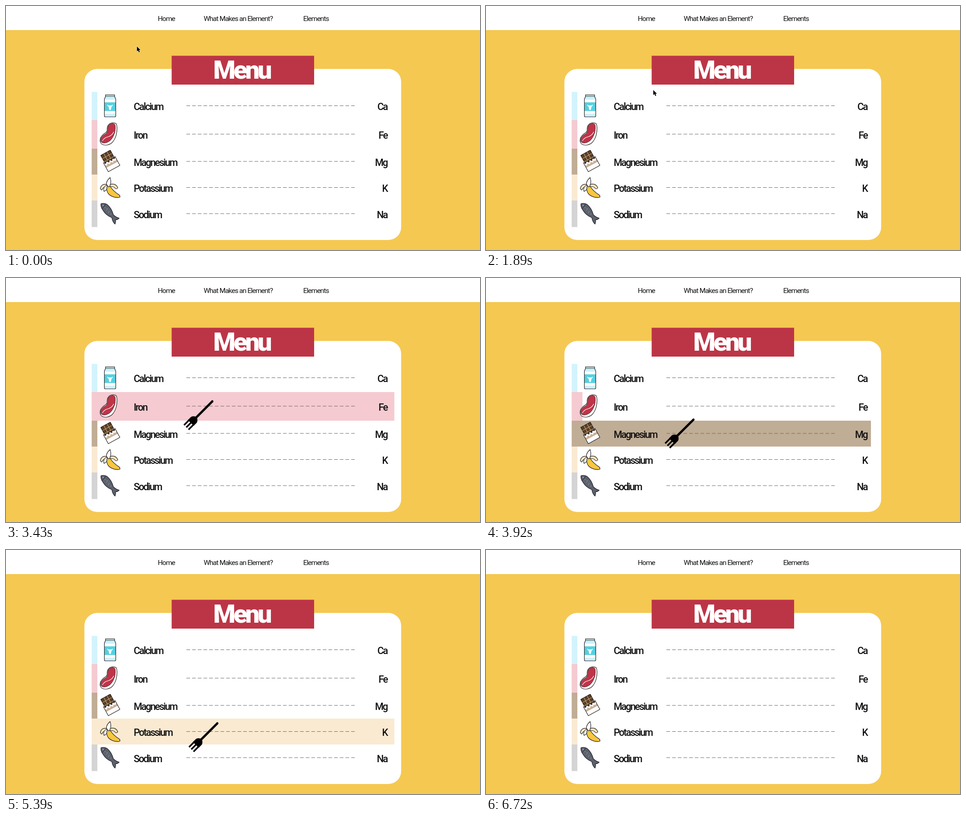
Animation of 1043x537 px, one loop 6790 ms. Source, as an HTML page with a canvas:

```html
<!DOCTYPE html>
<html lang="en">
<head>
<meta charset="utf-8">
<title>Menu of elements</title>
<style>
html, body { margin: 0; width: 100%; height: 100%; overflow: hidden; background: #f5c851; }
canvas { display: block; width: 1043px; height: 537px; }
</style>
</head>
<body>
<canvas id="stage" width="1043" height="537"></canvas>
<script>
const ctx = document.getElementById('stage').getContext('2d');
const LOOP = 6790, STEP = 70, EASE_MS = 500;
const INK = '#231f20';
const LEFT = 188.5, THIN = 12.5, FULL = 666;

const styles = {
  nav: { font: '400 15.5px Roboto, sans-serif', spacing: -1, fill: '#111' },
  label: { font: '500 21.5px Roboto, sans-serif', spacing: -2, fill: '#111' },
  title: { font: '900 56px Roboto, sans-serif', spacing: -4.5, fill: '#fff' }
};

// on and off: when the pointer enters and leaves the row
const rows = [
  { name: 'Calcium', sym: 'Ca', top: 189, end: 251, base: 229, line: 219.5, color: '#d3f3fd', on: 1950, off: 2710, icon: milk },
  { name: 'Iron', sym: 'Fe', top: 251, end: 314, base: 292, line: 282, color: '#f5cad0', on: 2710, off: 3490, icon: steak },
  { name: 'Magnesium', sym: 'Mg', top: 314, end: 371, base: 352, line: 342, color: '#c0ad95', on: 3490, off: 4290, icon: chocolate },
  { name: 'Potassium', sym: 'K', top: 371, end: 428, base: 409, line: 399.5, color: '#faead1', on: 4290, off: 5500, icon: banana },
  { name: 'Sodium', sym: 'Na', top: 428, end: 486.5, base: 467, line: 457, color: '#d4d4d4', on: 5500, off: 6030, icon: fish }
];
const forkOn = rows[0].on, forkOff = rows[4].off;

// pointer path: time, x, y
const path = [
  [0, 288, 88], [1190, 325, 127], [1950, 372, 189], [2590, 415, 241],
  [3430, 425, 309], [4290, 429, 371], [4550, 430, 377], [5390, 436, 419],
  [5500, 436, 428], [6030, 433, 486], [6720, 422, 535]
];

// CSS "ease" curve, solved by bisection
function ease(p) {
  if (p <= 0) return 0;
  if (p >= 1) return 1;
  let lo = 0, hi = 1, u;
  for (let i = 0; i < 24; i++) {
    u = (lo + hi) / 2;
    const x = 0.75 * u * (1 - u) + u ** 3;
    if (x < p) lo = u; else hi = u;
  }
  return 0.3 * u * (1 - u) ** 2 + 3 * u * u * (1 - u) + u ** 3;
}

function slope(i, k) {
  if (i === 0 || i === path.length - 1) return 0;
  const [a, b, c] = [path[i - 1], path[i], path[i + 1]];
  const m = (b[k] - a[k]) / (b[0] - a[0]), n = (c[k] - b[k]) / (c[0] - b[0]);
  return m * n <= 0 ? 0 : 2 * m * n / (m + n);
}

function pointer(t) {
  let i = 0;
  while (i < path.length - 2 && t > path[i + 1][0]) i++;
  const a = path[i], b = path[i + 1], d = b[0] - a[0];
  const u = Math.min(1, (t - a[0]) / d), v = 1 - u;
  return [1, 2].map(k => v * v * (1 + 2 * u) * a[k] + u * u * (3 - 2 * u) * b[k]
    + d * u * v * (v * slope(i, k) - u * slope(i + 1, k)));
}

function shape(d, fill, stroke, width = 1.2) {
  const p = new Path2D(d);
  if (fill) { ctx.fillStyle = fill; ctx.fill(p); }
  if (stroke) { ctx.strokeStyle = stroke; ctx.lineWidth = width; ctx.stroke(p); }
}

function rect(x, y, w, h, fill) {
  ctx.fillStyle = fill;
  ctx.fillRect(x, y, w, h);
}

function text(s, x, y, style, align = 'left') {
  ctx.font = style.font;
  ctx.letterSpacing = style.spacing + 'px';
  ctx.textAlign = align;
  ctx.fillStyle = style.fill;
  ctx.fillText(s, x, y);
}

function milk() {
  const body = 'M219 195.500H239V199L241.500 205V242Q241.500 244 239.500 244H218.500Q216.500 244 216.500 242V205L219 199Z';
  ctx.save();
  ctx.clip(new Path2D(body));
  rect(215, 194, 28, 52, '#fff');
  rect(215, 194, 28, 5, '#a9e6f0');
  rect(215, 199, 28, 7, '#cdf1fa');
  rect(215, 212, 28, 19, '#57d0e0');
  rect(215, 237, 28, 8, '#cdf1fa');
  ctx.restore();
  shape(body, null, INK);
  shape('M219 199H239', null, INK, 0.8);
  shape('M223 217L226 219H232L235 217L234.500 220L232 221.500L231 228Q229 229.500 227 228L226 221.500L223.500 220Z', '#fff');
}

function steak() {
  shape('M229 258.500Q237 255.500 242.500 259Q245.500 265 243.500 279Q241 294 232 302Q221 309 211.500 304.500Q205 300 208 290Q212 283 219 279Q223.500 276 222.500 270Q223 262 229 258.500Z', '#fff', INK);
  shape('M229 260Q235 257 239 260Q242 264 239.500 278Q236 290 228.500 297Q218 304 211 300.500Q206.500 297 209.500 290Q213 284 219.500 281Q225 277 224 270Q224 263 229 260Z', '#bf3448', INK, 0.8);
  shape('M212 297Q216 290 224 288Q234 285 237 277', null, '#fff', 1.2);
}

function chocolate() {
  ctx.save();
  ctx.translate(229, 341.500);
  ctx.rotate(-0.5);
  shape('M-12 -21H12V2H-12Z', '#5a3f25', INK);
  shape('M-4 -21V-4M4 -21V-4M-12 -13H12M-12 -5H12', null, '#d8b98f', 1);
  const wrap = 'M-14.500 -4L-11 0L-7 -4L-3 1L0 -4L4 1L7 -3L11 0L14.500 -4V18.500H-14.500Z';
  shape(wrap, '#fff');
  shape('M-14 3L-11 5L-7 2L-3 6L0 2L4 6L7 3L11 5L14 3V9H-14Z', '#c9ae95');
  shape(wrap, null, INK);
  ctx.restore();
}

function banana() {
  shape('M222 398Q218 387 229 377.500Q232 385 229.500 397Z', '#fff', INK);
  shape('M222 393Q210 390 207.500 402Q209 405 211 405Q213 398 222 398Z', '#fbe9b8', INK);
  shape('M229 393Q241 389 246 400Q244 403 241 402Q237 396 229 398Z', '#fbe9b8', INK);
  shape('M222 394Q213 398 215.500 408Q220 407 223.500 400Z', '#fff', INK);
  shape('M223 395Q225 400 229 396.500Q235 407 250 416.500L251 420L248 421.500Q234 422 226 414Q219 406 223 395Z', '#f8c63f', INK);
}

function fish() {
  shape('M209 435Q216 433 222 436.500Q232 444 236.500 460Q242 465 249 467Q246 470.500 241 470.500Q242 475 240 480Q234 475 233 466Q219 460 213 449Q208 442 209 435Z', '#5c616e', INK);
  shape('M211 445Q217 443 219 436', null, INK, 0.8);
  for (let i = 0; i < 6; i++) rect(217 + i * 2 + (i % 2) * 3, 443 + i * 2.8, 1.3, 1.3, '#b9bec8');
  rect(213, 438, 1.5, 1.5, '#fff');
}

function arrow(x, y) {
  const d = 'M0 0V11L2.600 8.700L4.400 13L6.500 12.100L4.700 8H8Z';
  ctx.save();
  ctx.translate(x, y + 1);
  shape(d, null, '#fff');
  shape(d, '#000');
  ctx.restore();
}

// axis runs from the handle end towards the tines
function fork(x, y) {
  ctx.save();
  ctx.translate(x + 29, y - 37.500);
  ctx.rotate(Math.PI * 3 / 4);
  ctx.lineCap = 'round';
  shape('M0 0H54', null, '#000', 5);
  shape('M50 -3Q54 -9 58 -9H67V9H58Q54 9 50 3Z', '#000');
  ctx.lineCap = 'butt';
  for (const s of [-7, 0, 7]) shape(`M64 ${s}H81`, null, '#000', 3.6);
  ctx.restore();
}

function barWidth(row, t) {
  const k = t < row.off ? ease((t - row.on) / EASE_MS) : 1 - ease((t - row.off - 15) / EASE_MS);
  return THIN + (FULL - THIN) * k;
}

function draw(t) {
  ctx.lineJoin = 'round';
  rect(0, 0, 1043, 537, '#f5c851');
  rect(0, 0, 1043, 53, '#fff');
  ctx.fillStyle = '#fff';
  ctx.beginPath();
  ctx.roundRect(172.5, 138.5, 697, 376.5, 28);
  ctx.fill();
  rect(364.5, 109.5, 313.5, 63.5, '#bc3546');

  text('Home', 334, 33, styles.nav);
  text('What Makes an Element?', 435, 33, styles.nav);
  text('Elements', 654, 33, styles.nav);
  text('Menu', 456, 160, styles.title);

  for (const r of rows) {
    rect(LEFT, r.top, barWidth(r, t), r.end - r.top, r.color);
    ctx.setLineDash([8, 4.5]);
    shape(`M397 ${r.line}H768`, null, '#666', 1);
    ctx.setLineDash([]);
    r.icon();
    text(r.name, 281, r.base, styles.label);
    text(r.sym, 841 + styles.label.spacing, r.base, styles.label, 'right');
  }

  const [x, y] = pointer(t);
  if (t >= forkOn && t < forkOff) fork(x, y); else arrow(x, y);
}

function tick(now) {
  draw(Math.floor(now % LOOP / STEP) * STEP);
  requestAnimationFrame(tick);
}
requestAnimationFrame(tick);
</script>
</body>
</html>
```
